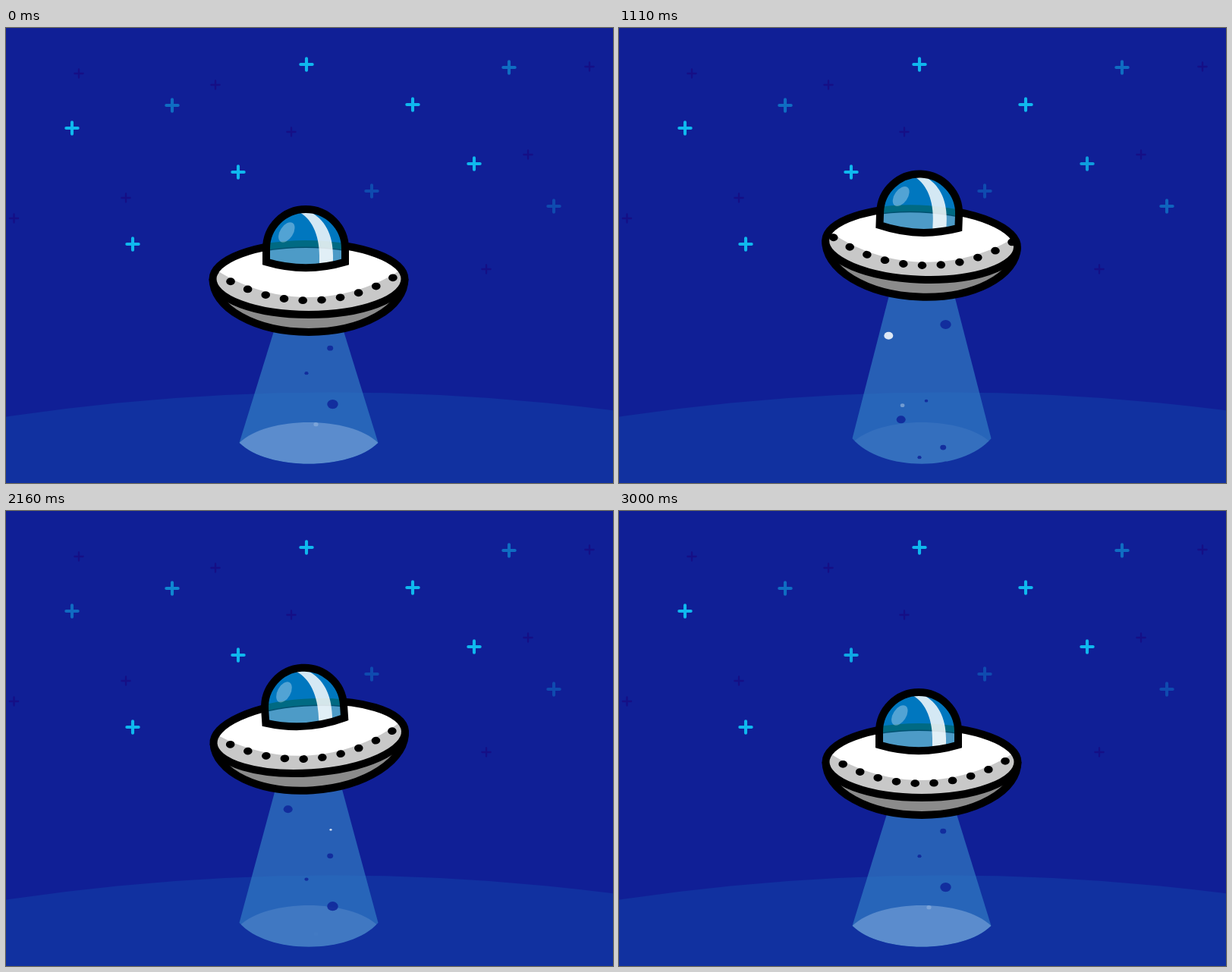
Write an HTML page with a canvas that moves like this. It is 800x600 px and loops after 3030 ms.

```html
<!DOCTYPE html>
<html lang="en">
<head>
<meta charset="utf-8">
<title>Flying saucer</title>
<style>
html, body { margin: 0; width: 100%; height: 100%; overflow: hidden; background: #101f96; }
canvas { display: block; }
</style>
</head>
<body>
<canvas id="stage" width="800" height="600"></canvas>
<script>
const ctx = document.getElementById('stage').getContext('2d');
const TAU = Math.PI * 2;
const LOOP = 3030, CYCLE = 3000, BEAT = 750, STEP = 30;
const FLOOR = 584, RISE = 250, SWING = 27.5;

// Each star twinkles in turn, in the order listed.
const brightStars = [[396, 48], [617, 179], [536, 101], [87, 132], [306, 190], [167, 285]];
const softStars = [[663, 52], [722, 235], [482, 215], [219, 102]];
const darkStars = [[96, 60], [276, 75], [769, 51], [376, 137], [688, 167], [158, 224], [10.5, 251], [633, 318]];

// Dark motes: x, radius, duration in beats. White motes: x, radius, start in beats.
const darkMotes = [[430.5, 7.2, 1.72], [427.2, 4, 1.42], [396, 2.6, 1.54], [371.7, 6, 1.22], [405, 2.3, 1.13]];
const whiteMotes = [[373.6, 2.8, .08], [428, 1.6, .28], [408.5, 3.1, .67], [355.3, 6, .84]];

const dome = new Path2D('M343 308.5V291A52 52 0 0 1 447 291V308.5Q395 324 343 308.5Z');
const streak = new Path2D('M385 242C402 250 413 272 413 300V322H431V300C431 272 420 252 400 242Z');
const beam = new Path2D('M369 348H429L490.5 547C453 584 345 584 307.5 547Z');
const pool = new Path2D('M307.5 547C345 511 453 511 490.5 547C453 584 345 584 307.5 547Z');
const disc = oval(399, 331, 126.5, 47);
const hull = oval(399, 331, 126.5, 70, 0, 0, Math.PI);

function oval(x, y, rx, ry, turn = 0, from = 0, to = TAU) {
  const p = new Path2D();
  p.ellipse(x, y, rx, ry, turn, from, to);
  return p;
}

function fill(path, color) {
  ctx.fillStyle = color;
  ctx.fill(path);
}

function outline(path) {
  ctx.strokeStyle = '#000';
  ctx.lineWidth = 10;
  ctx.stroke(path);
}

const ease = u => (1 - Math.cos(u * Math.PI)) / 2;
const clamp = v => Math.max(0, Math.min(1, v));
const pulse = (t, peak, half) => ease(clamp(1 - Math.abs(t - peak) / half));

function plus(x, y, r, width, color) {
  ctx.lineWidth = width;
  ctx.strokeStyle = color;
  ctx.beginPath();
  ctx.moveTo(x - r, y);
  ctx.lineTo(x + r, y);
  ctx.moveTo(x, y - r);
  ctx.lineTo(x, y + r);
  ctx.stroke();
}

const star = (x, y, alpha) => plus(x, y, 7.7, 4.1, `rgba(15,184,238,${alpha})`);

// One flat color per star keeps the crossing of its bars even.
function drawSky(t) {
  ctx.fillStyle = '#101f96';
  ctx.fillRect(0, 0, 800, 600);
  ctx.lineCap = 'round';
  darkStars.forEach(([x, y]) => plus(x, y, 5.6, 2.3, '#150f86'));
  brightStars.forEach(([x, y], i) => star(x, y, 1 - .5 * pulse(t, 300 + 620 * i, 320)));
  softStars.forEach(([x, y], i) => star(x, y, (x + y > 690 && x + y < 714 || i % 3 ? .29 : .51) + .17 * pulse(t, 480 + 560 * i, 400)));
  ctx.lineCap = 'butt';
  fill(oval(430, 480.5 + 2889, 2889, 2889), '#1131a0');
}

// A new mote leaves the floor every beat.
function drawMote(t, x, r, start, duration, color) {
  const last = Math.floor(t / BEAT - start);
  for (let k = last - 1; k <= last; k++) {
    const u = (t / BEAT - start - k) / duration;
    if (u > 1) continue;
    const y = FLOOR - RISE * ease(u);
    fill(oval(x, y, r, r * .84), color(y));
  }
}

function drawMotes(t) {
  for (const [x, r, duration] of darkMotes) {
    drawMote(t, x, r, duration / 2 - .555, duration, () => 'rgba(16,38,154,.87)');
  }
  for (const [x, r, start] of whiteMotes) {
    drawMote(t, x, r, start, 1, y => `rgba(235,243,250,${clamp((560 - y) / 165)})`);
  }
}

function drawBeam(t, lift) {
  const foot = 575, s = (227 + lift) / 227;
  ctx.save();
  ctx.translate(0, foot * (1 - s));
  ctx.scale(1, s);
  fill(beam, 'rgba(52,130,198,.65)');
  ctx.clip(beam);
  ctx.setTransform(1, 0, 0, 1, 0, 0);
  fill(pool, `rgba(225,240,255,${.28 - .125 * lift / SWING})`);
  drawMotes(t);
  ctx.restore();
}

function drawHull(t) {
  fill(hull, '#8b8b8b');
  outline(hull);
  fill(disc, '#c8c8c8');
  ctx.save();
  ctx.clip(disc);
  fill(oval(398.5, 132, 223, 223), '#fff');

  // running lights along the rim
  const r = 222, gap = 24.8;
  const first = (-7.3 - .0582 * t) % gap;
  for (let i = -5; i <= 6; i++) {
    const a = (first + i * gap) / r;
    fill(oval(398.5 + r * Math.sin(a), 137.3 + r * Math.cos(a), 5.8, 4.9), '#000');
  }
  ctx.restore();
  outline(disc);
}

function drawDome() {
  fill(dome, '#0077bf');
  ctx.save();
  ctx.clip(dome);
  fill(oval(395, 330, 130, 50), '#006a83');
  fill(oval(395, 338, 130, 49.5), '#00506f');
  fill(oval(395, 340, 130, 50), '#006fae');
  fill(streak, 'rgba(255,255,255,.83)');
  fill(oval(395, 340, 130, 50), 'rgba(255,255,255,.3)');
  fill(oval(369.8, 269.4, 8.6, 14.7, .57), 'rgba(255,255,255,.32)');
  ctx.restore();
  outline(dome);
}

function draw(t) {
  const angle = t / CYCLE * TAU;
  const lift = SWING * (1 - Math.cos(angle));
  const wave = Math.sin(angle);
  drawSky(t);
  drawBeam(t, lift);
  ctx.save();
  ctx.translate(399, 320 - lift);
  ctx.rotate(Math.PI / 45 * wave * Math.abs(wave));
  ctx.translate(-399, -320);
  drawHull(t);
  drawDome();
  ctx.restore();
}

const begin = performance.now();
function tick() {
  const t = (performance.now() - begin) % LOOP;
  draw(Math.floor(t / STEP) * STEP);
  requestAnimationFrame(tick);
}
tick();
</script>
</body>
</html>
```
